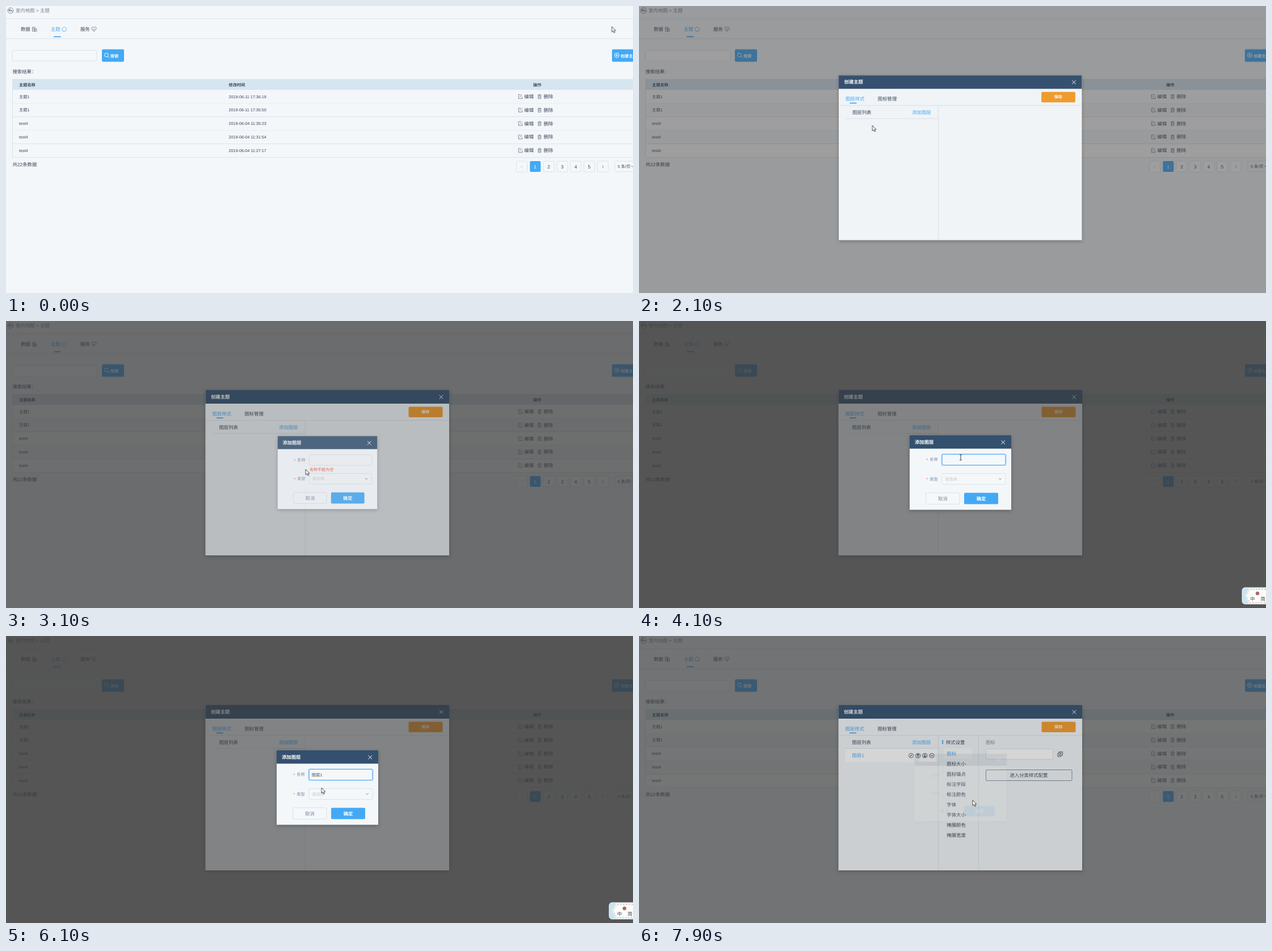
An HTML page for the animation above (8 s loop, 1105x507 px).

```html
<!DOCTYPE html>
<html lang="zh-CN">
<head>
<meta charset="utf-8">
<title>主题</title>
<style>
html, body { margin: 0; width: 100%; height: 100%; overflow: hidden; background: #f3f7fa; }
svg { display: block; }
svg.stage { width: 1105px; height: 507px; font-family: "Liberation Sans", "Noto Sans CJK SC", "Noto Sans CJK", sans-serif; font-size: 8.4px; text-rendering: geometricPrecision; }
/* y of every text is its middle */
text { transform: translateY(.37em); fill: #3b4557; white-space: pre; }
.s { font-size: 7.2px; }
.b { font-weight: 700; }
.m { text-anchor: middle; }
.w { fill: #fff; }
.blue { fill: #44a9f5; }
.soft { fill: #7c86a4; }
.grey { fill: #7a818d; }
.red { fill: #ed5038; }
.hint { fill: #c3c8d0; }
.body { fill: #f3f7fa; }
.head { fill: #33506f; }
.rule { stroke: #dbe3ea; fill: none; }
.box { stroke: #dbe2e8; fill: #f4f8fa; }
.lift { fill: #fff; opacity: .8; }
.ico { fill: none; stroke: #68717f; stroke-width: .8; }
.x { fill: none; stroke: #fff; stroke-width: 1; }
.anim { animation: 8s linear infinite paused; }
.mask { fill: #373737; }
#mask1 { animation-name: mask1; }
#mask2 { animation-name: mask2; }
#win1 { animation-name: win1; transform-origin: 566px 268px; filter: drop-shadow(0 2px 3px rgba(0,0,0,.25)); }
#win2 { animation-name: win2; transform-origin: 566.5px 267.7px; filter: drop-shadow(0 2px 3px rgba(0,0,0,.25)); }
#list { animation-name: list; transform-origin: 590px 291px; }
#ptr { animation-name: ptr; }
@keyframes mask1 { 0%, 23.28% { opacity: 0 } 27.03%, 100% { opacity: .6 } }
@keyframes mask2 { 0%, 36.88% { opacity: 0 } 40.63%, 96.44% { opacity: .6 } 100% { opacity: 0 } }
@keyframes win1 {
  0% { opacity: 0; transform: scale(.9) }
  23.28% { opacity: 0; transform: scale(.9); animation-timing-function: ease }
  27.03%, 100% { opacity: 1; transform: none }
}
@keyframes win2 {
  0% { opacity: 0; transform: scale(.9) }
  36.88% { opacity: 0; transform: scale(.9); animation-timing-function: ease }
  40.63% { opacity: 1; transform: none }
  96.44% { opacity: 1; transform: none; animation-timing-function: ease }
  100% { opacity: 0; transform: scale(.9) }
}
@keyframes list {
  0%, 82% { opacity: 0; transform: scaleY(.8) }
  85.5%, 90% { opacity: 1; transform: none }
  93%, 100% { opacity: 0; transform: scaleY(.8) }
}
@keyframes ptr {
  0% { transform: translate(1069px, 36px) }
  2.5% { transform: translate(800px, 92px) }
  5% { transform: translate(250px, 120px) }
  7.5%, 8.75% { transform: translate(95px, 36px) }
  11.25% { transform: translate(91px, 40px) }
  12.5% { transform: translate(91px, 40px); animation-timing-function: ease-in-out }
  21.25%, 22.5% { transform: translate(1075px, 89px) }
  23.75% { transform: translate(1075px, 97px) }
  26.25% { transform: translate(411px, 211px) }
  31.25% { transform: translate(498px, 185px) }
  36.25% { transform: translate(497px, 188px) }
  38.75% { transform: translate(528px, 262px) }
  42.5% { transform: translate(556px, 246px) }
  45%, 75% { transform: translate(567px, 241px) }
  76.25% { transform: translate(556px, 268px) }
  80% { transform: translate(588px, 281px) }
  86.25% { transform: translate(590px, 284px) }
  90% { transform: translate(572px, 301px) }
  95%, 96.25% { transform: translate(592px, 306px) }
  98.75%, 100% { transform: translate(588px, 290px) }
}
</style>
</head>
<body>
<svg class="stage" viewBox="0 0 1105 507">
  <defs>
    <g id="edit" class="ico"><path d="M5 .5H1V7.5H7.5V4M3 5L7.5 .5"/></g>
    <g id="bin" class="ico"><path d="M0 1.8H6.6M2 1.8V.4H4.6V1.8M.9 1.8V7.6H5.7V1.8M2.5 3.5V6M4.1 3.5V6"/></g>
    <path id="close" class="x" d="M-3.3 -3.3L3.3 3.3M3.3 -3.3L-3.3 3.3"/>
    <path id="chev" class="ico" d="M-2.3 -1.2L0 1.2L2.3 -1.2"/>
  </defs>

  <rect class="body" width="1105" height="507"/>
  <g class="ico"><circle cx="8" cy="8" r="5"/><path d="M7.5 5.2L5 7.5L7.5 9.8M5 7.5H9Q11 7.8 11 10.5" stroke-width="1.1"/></g>
  <text class="grey" x="17" y="8">室内地图 &gt; 主题</text>
  <path class="rule" d="M0 22.5H1105M0 57.8H1105"/>
  <text x="26" y="41">数据</text>
  <g class="ico"><path d="M46.5 37.5H51V44.5H46.5ZM47.5 39.5H50M47.5 41.5H50"/><rect x="50.5" y="40.5" width="3.5" height="4"/></g>
  <text class="blue" x="79" y="41">主题</text>
  <path class="ico" style="stroke:#5da9ee" d="M102.5 36.7L106.7 40L105 44.5H100L98.4 40Z"/>
  <rect class="blue" x="84" y="53.4" width="12.5" height="1.8"/>
  <text x="131" y="41">服务</text>
  <path class="ico" d="M155 45L151 40.7C150 37 153.5 36 155 38.5C156.5 36 160 37 159 40.7ZM153 40.5L155 42.3L157 40"/>

  <rect class="box" x="11.5" y="78.5" width="148.5" height="18.5" rx="2"/>
  <rect class="lift" data-on="1900 3300 7800 8000" x="12" y="79" width="147.5" height="17.5"/>
  <rect class="blue" x="169" y="76.5" width="39" height="22" rx="2"/>
  <g class="x"><circle cx="177" cy="86.5" r="3.3"/><path d="M179.5 89L182 91.5"/></g>
  <text class="s b w" x="184" y="88">搜索</text>
  <rect class="blue" x="1068" y="76.5" width="50" height="22" rx="2"/>
  <rect data-on="1700 2000" x="1068" y="76.5" width="50" height="22" rx="2" fill="#4b97ea"/>
  <rect data-on="2000 3000" x="1067.5" y="76" width="50" height="23" rx="2" fill="none" stroke="#a9d8ff" stroke-opacity=".6"/>
  <g class="x"><circle cx="1076.5" cy="87" r="4"/><path d="M1074.2 87H1078.8M1076.5 84.7V89.3"/></g>
  <text class="s b w" x="1083" y="88">创建主题</text>

  <text x="11.5" y="116">搜索结果：</text>
  <rect x="11.5" y="129" width="1094" height="19.2" fill="#d6e6f0"/>
  <text class="s b" x="23" y="139">主题名称</text>
  <text class="s b" x="392.5" y="139">修改时间</text>
  <text class="s b" x="929" y="139">操作</text>
  <g id="rows"></g>
  <path class="rule" d="M11.5 129V267.5H1105M11.5 195.7H1105M11.5 243.5H1105"/>
  <path class="rule" opacity=".5" d="M11.5 172H1105M11.5 219.6H1105"/>
  <text x="11.5" y="280">共22条数据</text>
  <g id="pages"></g>
  <rect class="box" x="1073" y="274" width="50" height="18.5" rx="2"/>
  <text class="s" x="1078" y="283.5">5 条/页</text>
  <use href="#chev" x="1104" y="283"/>

  <rect class="mask anim" id="mask1" width="1105" height="507"/>
  <g class="anim" id="win1">
    <rect class="body" x="351.5" y="122" width="429.5" height="292"/>
    <rect class="head" x="351.5" y="122" width="429.5" height="24"/>
    <text class="b w" x="361" y="134">创建主题</text>
    <use href="#close" x="767" y="134.3"/>
    <text class="blue" x="363.5" y="163.5">图层样式</text>
    <rect class="blue" x="371" y="170.4" width="12" height="1.8"/>
    <text x="420.5" y="163.5">图标管理</text>
    <rect x="709.5" y="151.5" width="60" height="18.5" rx="2" fill="#f39c2b"/>
    <text class="s b w m" x="739.3" y="160.5">保存</text>
    <path class="rule" d="M351.5 175.5H781M527.5 175.5V414M363.5 198.7H527.5"/>
    <text x="375.5" y="187.5">图层列表</text>
    <text class="blue" x="481" y="187.5">添加图层</text>
    <g data-on="7800 8000">
      <rect x="363.5" y="199.5" width="163.5" height="23.5" fill="#fff"/>
      <text class="blue" x="375.5" y="211.3">图层1</text>
      <g class="ico" style="stroke:#333d4d">
        <circle cx="479.5" cy="211.3" r="4"/><circle cx="491.7" cy="211.3" r="4"/><circle cx="503.8" cy="211.3" r="4"/><circle cx="516" cy="211.3" r="4"/>
        <path d="M477.8 213L481.2 209.6M491.7 214V209M490 210.7L491.7 208.9L493.4 210.7M503.8 208.6V213.6M502.1 212L503.8 213.8L505.5 212M513.8 211.3H518.2" stroke-width="1.1"/>
        <path d="M738 207H743.5V213H738ZM740 207V204.5H746.5V211H743.5M739.3 210H742.2M740.8 208.5V211.5M742 206.5H745"/>
      </g>
      <path class="rule" d="M598.5 175.5V414"/>
      <rect class="blue" x="534.3" y="184" width="1.8" height="7"/>
      <text x="541" y="187.5">样式设置</text>
      <rect class="lift" x="537" y="199" width="50" height="18"/>
      <g id="styles"></g>
      <text class="soft" x="611" y="187.5">图标</text>
      <rect class="box" style="fill:#fff" x="611.5" y="199.5" width="118" height="18.3" rx="2"/>
      <rect x="611.5" y="236.5" width="151.5" height="19" rx="1.5" fill="none" stroke="#5f7288" stroke-width=".8"/>
      <text class="m" x="687" y="246">进入分类样式配置</text>
    </g>
  </g>

  <rect class="mask anim" id="mask2" width="1105" height="507"/>
  <g class="anim" id="win2">
    <rect class="body" x="477" y="202" width="179" height="131.5"/>
    <rect class="head" x="477" y="202" width="179" height="23.5"/>
    <text class="b w" x="486" y="213.7">添加图层</text>
    <use href="#close" x="641.7" y="214.3"/>
    <text class="s red" x="506.3" y="245.5">*</text>
    <text class="s soft" x="512.3" y="244.7">名称</text>
    <rect class="box" x="534" y="235.5" width="112" height="19" rx="2"/>
    <g data-on="3700 6600" fill="none" stroke="#57a9f5">
      <rect x="533.5" y="235" width="113" height="20" rx="2.5" stroke-width="2.2" opacity=".3"/>
      <rect x="534" y="235.5" width="112" height="19" rx="2"/>
    </g>
    <text class="s" data-on="5400 8000" x="539" y="245.2">图层</text>
    <text class="s" data-on="5600 8000" x="553.4" y="245.2">1</text>
    <rect data-on="3700 4100 4600 5000" x="539" y="241" width=".8" height="9" fill="#222"/>
    <rect data-on="5400 5600" x="553.6" y="241" width=".8" height="9" fill="#222"/>
    <rect data-on="5600 6100" x="557.6" y="241" width=".8" height="9" fill="#222"/>
    <text class="s red" data-on="2900 3300" x="534.3" y="262">名称不能为空</text>
    <text class="s red" x="506.3" y="279.8">*</text>
    <text class="s soft" x="512.3" y="279">类型</text>
    <rect class="box" x="534" y="269.5" width="112" height="19" rx="2"/>
    <rect data-on="6600 7700" x="534" y="269.5" width="112" height="19" rx="2" fill="none" stroke="#57a9f5"/>
    <text class="s hint" data-on="0 7200" x="539" y="279">请选择</text>
    <text class="s" data-on="7200 8000" x="539" y="279">点</text>
    <use href="#chev" x="636.5" y="279"/>
    <rect class="box" x="505.5" y="303.5" width="59.5" height="20" rx="2"/>
    <text class="soft m" x="535.3" y="313.5">取消</text>
    <rect class="blue" x="573" y="303.5" width="60" height="20" rx="2"/>
    <text class="b w m" x="603" y="313.5">确定</text>
  </g>
  <g class="anim" id="list">
    <rect x="534" y="291.5" width="112" height="76" rx="2" fill="#fff" stroke="#dbe2e8" stroke-width=".6"/>
    <rect data-on="7000 7500" x="534.5" y="294" width="111" height="18" fill="#f0f4f8"/>
    <g id="kinds"></g>
  </g>

  <g data-on="4900 5400">
    <rect data-on="4900 5200" x="544.5" y="259.5" width="211" height="60" rx="5" fill="#fdfefe" stroke="#bcdde9"/>
    <rect data-on="5200 5400" x="544.5" y="259.5" width="257" height="60" rx="5" fill="#fdfefe" stroke="#bcdde9"/>
    <path d="M552 287.5H748" stroke="#e3bdb6" stroke-width=".8" stroke-dasharray="3 2"/>
    <g font-size="11">
      <text data-on="4900 5000" x="554" y="274">t</text>
      <text data-on="5000 5200" x="554" y="274">tu</text>
      <text data-on="5200 5400" x="554" y="274">tu'ceng</text>
      <text data-on="4900 5000" x="554" y="303">1.他  2.她  3.天  4.图  5.听</text>
      <text data-on="5000 5200" x="554" y="303">1.图  2.土  3.吐  4.突  5.途</text>
      <text data-on="5200 5400" x="554" y="303">1.图层  2.涂层  3.土层  4.图  5.土</text>
    </g>
  </g>
  <g data-on="3400 6500">
    <rect x="1063" y="471" width="50" height="29" rx="5" fill="#c9e5f1" stroke="#eef6f9"/>
    <path d="M1075 472.5L1068.5 485.5L1075 499H1110V472.5Z" fill="#fdfcfa"/>
    <path d="M1105 474.3H1076L1070 485.5L1076 497.3H1105" fill="none" stroke="#cf9a90" stroke-width=".9" stroke-dasharray="3 2"/>
    <circle cx="1090" cy="481.3" r="3.2" fill="#a56a68"/>
    <text x="1077" y="490.5">中</text>
    <text x="1095.5" y="490.5">简</text>
  </g>

  <g class="anim" id="ptr">
    <path data-on="0 600 1200 1700 1900 2500 3000 3400 6100 6300 7800 8000" d="M0 0V9.6L2.2 7.6L3.8 11L5.4 10.3L3.9 7H6.8Z" fill="#fff" stroke="#222" stroke-width=".8"/>
    <path data-on="600 1200 1700 1900 2500 3000 6300 7800" d="M2.5 9V1.2Q3.4 0 4.4 1.2V5.4L9 6.3Q10 6.6 9.9 8L9 14H4L.3 9.3Q.4 7.6 2.5 9Z" fill="#fff" stroke="#222" stroke-width=".8"/>
    <path data-on="3400 6100" d="M-2 -4.8H-.6L0 -4.3L.6 -4.8H2M0 -4.3V4.3M-2 4.8H-.6L0 4.3L.6 4.8H2" fill="none" stroke="#222" stroke-width=".9"/>
  </g>
</svg>
<script>
const fill = (id, items, draw) => {
  document.getElementById(id).innerHTML = items.map(draw).join('');
};

fill('rows', ['主题1|11 17:36:19', '主题1|11 17:35:50', 'test4|04 11:35:23', 'test4|04 11:31:54', 'test4|04 11:27:17'], (row, i) => {
  const [name, time] = row.split('|'), y = 160 + i * 23.8;
  const stripe = i % 2 ? '' : `<rect class="lift" data-on="1900 3300 7800 8000" x="12" y="${y - 11.6}" width="1093" height="23.4"/>`;
  return `${stripe}<text class="s" x="23" y="${y}">${name}</text>
    <text class="s" x="392.5" y="${y}">2019-06-${time}</text>
    <use href="#edit" x="902.3" y="${y - 4}"/><text x="913.3" y="${y}">编辑</text>
    <use href="#bin" x="937" y="${y - 4}"/><text x="947.5" y="${y}">删除</text>`;
});

fill('pages', ['', '1', '2', '3', '4', '5', ''], (label, i) => {
  const x = 899.5 + i * 23.8, on = i === 1;
  const arrow = `<path class="ico" ${i ? '' : 'opacity=".4"'} d="M-1.2 -2.3L1.2 0L-1.2 2.3" transform="translate(${x + 9.5} 284) scale(${i ? 1 : -1} 1)"/>`;
  const lift = on ? '' : `<rect class="lift" data-on="1900 3300 7800 8000" x="${x + .5}" y="274.5" width="18" height="18"/>`;
  return `<rect class="${on ? 'blue' : 'box'}" x="${x}" y="274" width="19" height="19" rx="2"/>${lift}` +
    (label ? `<text class="m ${on ? 'w' : ''}" x="${x + 9.4}" y="283.5">${label}</text>` : arrow);
});

fill('styles', ['图标', '图标大小', '图标锚点', '标注字段', '标注颜色', '字体', '字体大小', '掩膜颜色', '掩膜宽度'], (s, i) =>
  `<text class="${i ? '' : 'blue'}" x="542.3" y="${208.3 + i * 17.9}">${s}</text>`);

fill('kinds', ['点', '线', '面', '体'], (s, i) =>
  `<text class="s" x="540" y="${303 + i * 18}">${s}</text>`);

const LOOP = 8000, STEP = 100;
const anims = document.getAnimations();
const timed = [...document.querySelectorAll('[data-on]')].map(el => ({ el, spans: el.dataset.on.split(' ').map(Number) }));
const start = performance.now();

// The picture advances ten times a second, like a screen recording.
function render() {
  const t = Math.floor((performance.now() - start + 20) / STEP) * STEP % LOOP;
  for (const a of anims) a.currentTime = t + 1;
  for (const { el, spans } of timed) {
    const on = spans.some((from, i) => i % 2 === 0 && t >= from && t < spans[i + 1]);
    el.style.display = on ? '' : 'none';
  }
  requestAnimationFrame(render);
}
render();
</script>
</body>
</html>
```
